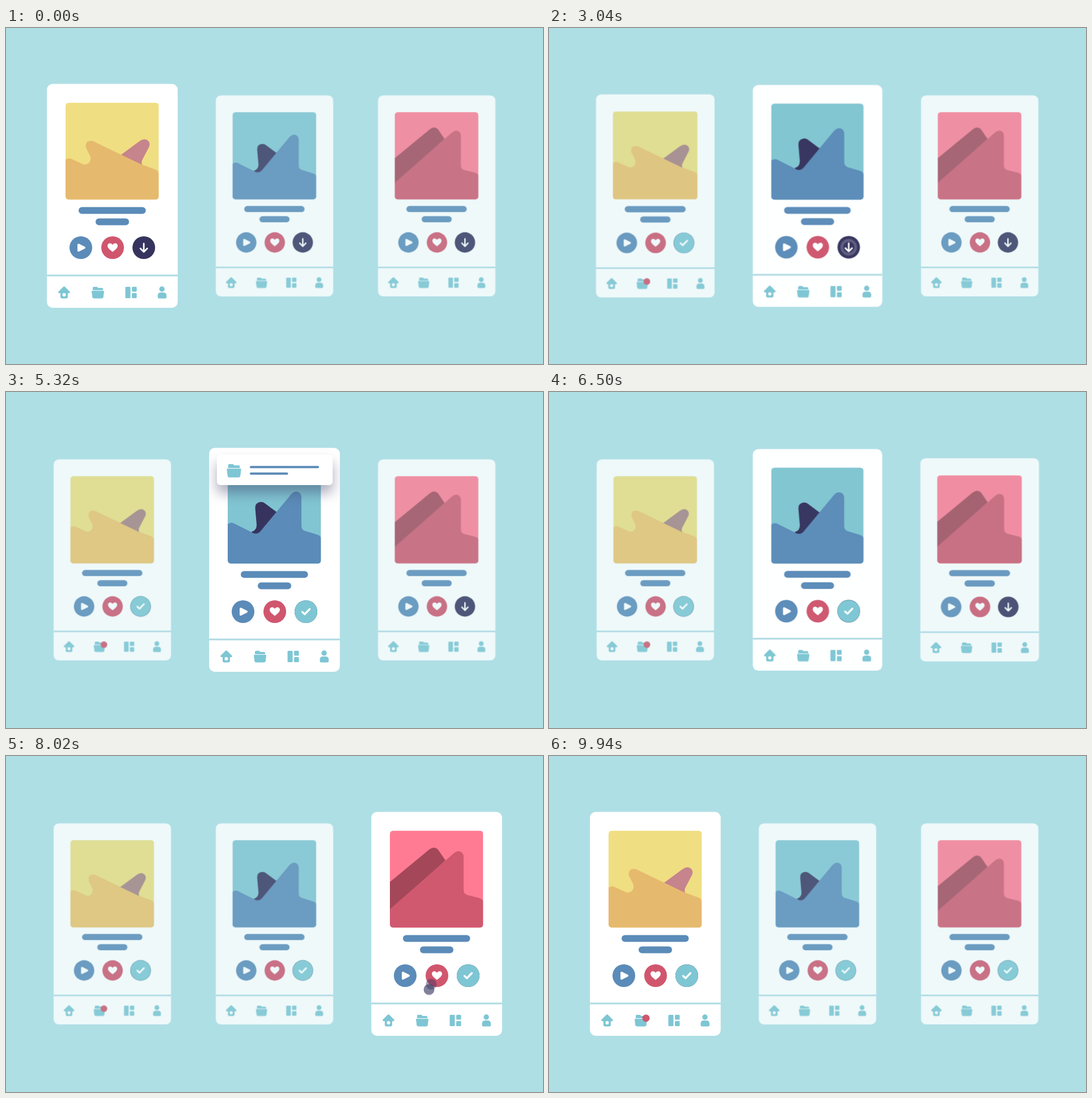
An HTML page that plays this animation: 947x592 px, repeating every 9.96 s.

```html
<!DOCTYPE html>
<html lang="en">
<head>
<meta charset="utf-8">
<title>Download feedback cards</title>
<style>
  html, body { margin: 0; width: 100%; height: 100%; overflow: hidden; background: #aedfe5; }
  svg { display: block; width: 100%; height: 100%; }
  .card { transform-origin: 187.5px 296px; }
  .blue { fill: #5b8bb8; }
  .red { fill: #d0566e; }
  .navy { fill: #36345e; }
  .teal { fill: #7ec6d4; }
  .white { fill: #fff; }
  .line { fill: none; stroke: #fff; stroke-linecap: round; stroke-linejoin: round; }
  .ripple, .done { transform-origin: 243px 387px; }
  .ripple { fill: none; stroke: #fff; stroke-width: 5; opacity: 0; }
  .folder { transform-origin: 162px 466px; }
  .badge { transform-origin: 171px 462px; }
  .toast > .box { filter: drop-shadow(0 14px 11px rgba(54, 52, 94, .42)); }
  .ball { opacity: 0; }
</style>
</head>
<body>
<svg id="stage" viewBox="0 0 947 592" preserveAspectRatio="none">
  <defs>
    <clipPath id="cardClip"><rect x="72.25" y="98.5" width="230.5" height="394.5" rx="10"/></clipPath>
    <clipPath id="photoClip"><rect x="105" y="131.5" width="164.5" height="171" rx="6"/></clipPath>
    <clipPath id="buttonClip"><circle cx="243" cy="387" r="19"/></clipPath>
    <g id="folder" class="teal">
      <path d="M153 462V458Q153 456 155 456H160.500L162.500 458H169Q171 458 171 460V462Z"/>
      <path d="M151.500 463.500H172.500L171.300 474Q171 476 169 476H155Q153 476 152.700 474Z" stroke="#7ec6d4" stroke-linejoin="round"/>
    </g>
  </defs>
</svg>
<script>
const LOOP = 9960;
const SWAP = 1000;
const stage = document.getElementById('stage');

const TAIL = 'V302.500H105Z';
const CARDS = [
  {
    x: 0, tap: 150, swaps: [2400, 8780], on: true,
    colors: ['#f0de82', '#c6848c', '#e6ba6e'],
    dim: ['#ebde80', '#a68180', '#ebc16c'],
    back: 'M202 224L236 199Q245 193 251 199Q255 204 252 210L240 233Q238 238 242 245L202 240Z',
    front: 'M105 232Q110 228 116 231L136 240Q144 242 148 235Q150 231 148 225L141 211Q139 201 147 199Q153 198 159 202L238 240L260 248Q269.500 250 269.500 258' + TAIL
  },
  {
    x: 286, tap: 2900, swaps: [2400, 6400], on: false,
    colors: ['#81c5d2', '#36345e', '#5b8bb8'],
    back: 'M147 246Q156 244 156 234L153.500 205Q153 196 161 194Q165 193 169 195L192 212L164 252H150Z',
    front: 'M105 233Q109 229 115 231L147 247Q156 253 163 245L217 180Q224 173 231 177Q235 180 235 186V236Q235 243 242 245L262 251Q269.500 253 269.500 258' + TAIL
  },
  {
    x: 572, tap: 6900, swaps: [6400, 8780], on: false,
    colors: ['#ff7b93', '#a44859', '#d0596f'],
    back: 'M105 222L174 165Q183 158 190 165L203 184L105 272Z',
    front: 'M105 270L218 171Q226 165 232 170Q235 173 235 178V236Q235 243 242 245L262 250Q269.500 252 269.500 257' + TAIL
  }
];

const cardMarkup = c => `
<g transform="translate(${c.x} 0)"><g class="card">
  <rect class="white" x="72.250" y="98.500" width="230.500" height="394.500" rx="10"/>
  <rect x="72.250" y="434.500" width="230.500" height="3" fill="#aedae4"/>
  <g clip-path="url(#photoClip)">
    <rect class="tint" x="105" y="131.500" width="164.500" height="171" fill="${c.colors[0]}"/>
    <path class="tint" d="${c.back}" fill="${c.colors[1]}"/>
    <path class="tint" d="${c.front}" fill="${c.colors[2]}"/>
  </g>
  <rect class="blue" x="128" y="315.500" width="118.500" height="12" rx="6"/>
  <rect class="blue" x="158" y="335.500" width="59" height="12" rx="6"/>

  <circle class="blue" cx="132" cy="387" r="20"/>
  <path class="line" d="M128 382L138 387L128 392Z" style="fill:#fff" stroke-width="4"/>
  <circle class="red" cx="188" cy="387" r="20"/>
  <path class="white" d="M188 394.500C184 391 179 388 179 383.500C179 378.500 185.500 377.500 188 382C190.500 377.500 197 378.500 197 383.500C197 388 192 391 188 394.500Z"/>
  <circle class="navy" cx="243" cy="387" r="20"/>
  <g clip-path="url(#buttonClip)">
    <circle class="ripple" cx="243" cy="387" r="13"/>
    <path class="arrow line" d="M243 380V394M237 388.500L243 394.500L249 388.500" stroke-width="2.800"/>
  </g>
  <circle class="done teal" cx="243" cy="387" r="20"/>
  <path class="check line" d="M236.500 387.500L240.800 391.500L249.500 382.500" pathLength="1" stroke-width="3.400" stroke-dasharray="1 2"/>

  <g class="teal">
    <path d="M102.500 457L111 465.500H94Z" stroke="#7ec6d4" stroke-width="3.500" stroke-linejoin="round"/>
    <rect x="96" y="463" width="13" height="13.500" rx="3"/>
    <circle class="white" cx="102.500" cy="470" r="3"/>
    <rect x="210.500" y="456" width="9" height="20" rx="1.500"/>
    <rect x="222" y="456" width="8.500" height="8.500" rx="1.500"/>
    <rect x="222" y="467" width="8.500" height="9" rx="1.500"/>
    <circle cx="275" cy="460" r="4.700"/>
    <path d="M267.500 474V471.500Q267.500 466 273 466H277.500Q283 466 283 471.500V474Q283 476.500 280.500 476.500H270Q267.500 476.500 267.500 474Z"/>
  </g>
  <g class="folder"><use href="#folder"/></g>
  ${c.x === 0 ? '<circle class="badge red" cx="171" cy="462" r="6.500"/>' : ''}
  ${c.x === 286 ? `<g clip-path="url(#cardClip)"><g class="toast">
    <rect class="box white" x="86" y="110" width="204" height="54" rx="6"/>
    <use href="#folder" transform="translate(116 138.500) scale(1.150) translate(-162 -466)"/>
    <rect class="blue" x="144" y="130.300" width="122" height="4" rx="2"/>
    <rect class="blue" x="144" y="141.800" width="67.500" height="4" rx="2"/>
  </g></g>` : ''}
  ${c.x === 572 ? '<circle class="ball navy" r="9.500"/><circle class="ball navy" r="9.500"/>' : ''}
</g></g>`;

stage.insertAdjacentHTML('beforeend', CARDS.map(cardMarkup).join(''));

// steps: [time in ms, properties, easing towards the next step]
function track(el, steps) {
  const first = steps[0], last = steps[steps.length - 1];
  const all = [[0, first[1]], ...steps, [LOOP, last[1]]];
  el.animate(
    all.map(([t, props, easing = 'linear']) => ({ ...props, offset: t / LOOP, easing })),
    { duration: LOOP, iterations: Infinity }
  );
}

function toggle(el, card, on, off) {
  let active = card.on;
  track(el, card.swaps.flatMap(t => {
    const from = active ? on : off, to = active ? off : on;
    active = !active;
    return [[t, from, 'ease'], [t + SWAP, to]];
  }));
}

function download(root, t) {
  const find = name => root.querySelector(name);
  track(find('.ripple'), [
    [t, { transform: 'scale(.6)', opacity: 0 }],
    [t + 60, { transform: 'scale(.75)', opacity: .2 }],
    [t + 180, { transform: 'scale(1.05)', opacity: .2 }],
    [t + 340, { transform: 'scale(1.4)', opacity: 0 }]
  ]);
  track(find('.arrow'), [
    [t + 350, { transform: 'translateY(0px)' }, 'ease-in'],
    [t + 750, { transform: 'translateY(30px)' }]
  ]);
  track(find('.done'), [
    [t + 720, { transform: 'scale(0)' }, 'ease-out'],
    [t + 930, { transform: 'scale(1)' }]
  ]);
  track(find('.check'), [
    [t + 849, { strokeDashoffset: 1, opacity: 0 }],
    [t + 850, { strokeDashoffset: 1, opacity: 1 }, 'ease-out'],
    [t + 1080, { strokeDashoffset: 0, opacity: 1 }]
  ]);
}

document.querySelectorAll('.card').forEach((root, i) => {
  const card = CARDS[i];
  toggle(root, card,
    { transform: 'scale(1)', opacity: 1 },
    { transform: 'scale(.898)', opacity: .8 });
  if (card.dim) {
    root.querySelectorAll('.tint').forEach((el, k) =>
      toggle(el, card, { fill: card.colors[k] }, { fill: card.dim[k] }));
  }
  download(root, card.tap);
});

// First card: badge pops on the folder
track(document.querySelector('.badge'), [
  [1300, { transform: 'scale(0)' }, 'ease-out'],
  [1520, { transform: 'scale(1.75)' }, 'ease-in-out'],
  [1900, { transform: 'scale(1)' }]
]);

// Second card: message slides in and out
const hidden = { transform: 'translateY(-110px)' };
const shown = { transform: 'translateY(0px)' };
track(document.querySelector('.toast'), [
  [4020, hidden, 'cubic-bezier(.2,.7,.2,1)'],
  [4700, shown],
  [5330, shown, 'ease-in-out'],
  [6000, hidden]
]);

// Third card: ball flies from the button into the folder
const curve = (a, b, c, s) => (1 - s) ** 2 * a + 2 * s * (1 - s) * b + s * s * c;
const FLIGHT = 320, PARTS = 16;
document.querySelectorAll('.ball').forEach((ball, i) => {
  const start = 7786 + i * 20;
  const steps = [];
  for (let k = 0; k <= PARTS; k++) {
    const s = k / PARTS;
    const x = curve(243, 178, 162, s), y = curve(387, 340, 466, s);
    const opacity = Math.min(1, s * 8, (1 - s) * 8) * (i ? .45 : .62);
    steps.push([start + s * FLIGHT, { transform: `translate(${x}px, ${y}px)`, opacity }]);
  }
  track(ball, steps);
});
track(document.querySelectorAll('.folder')[2], [
  [8090, { transform: 'scale(1)' }, 'ease-out'],
  [8190, { transform: 'scale(1.18)' }, 'ease-in-out'],
  [8370, { transform: 'scale(1)' }]
]);
</script>
</body>
</html>
```
